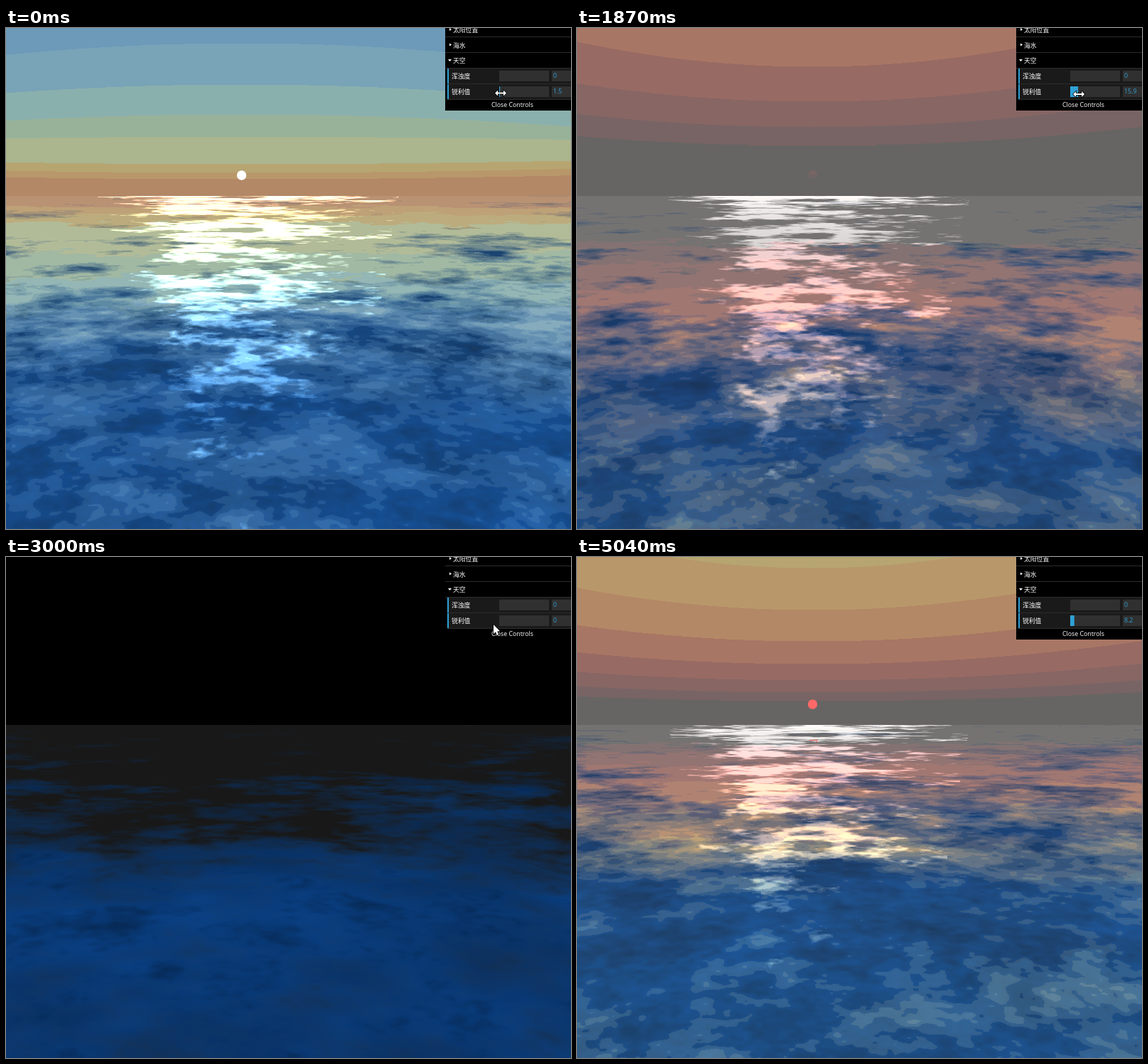
An HTML page with a canvas for the animation above (5140 ms loop, 795 by 704 pixels).

```html
<!DOCTYPE html>
<html lang="zh">
<head>
<meta charset="utf-8">
<title>Ocean sky</title>
<style>
  html, body { margin: 0; width: 100%; height: 100%; overflow: hidden; background: #000; }
  canvas { display: block; }
</style>
</head>
<body>
<canvas id="stage" width="795" height="704"></canvas>
<script>
const start = performance.now();
const W = 795, H = 704, HORIZON = 236, SUN_X = 331, LOOP = 5140, STEP = 157.5;
const ctx = document.getElementById('stage').getContext('2d');
const image = ctx.createImageData(W, H);
const px = image.data.fill(255);

// slider value at a few steps; linear in between
const drag = [[0, 1.5], [8, 12.6], [12, 15.9], [16, 4.9], [18, 0], [21, 0], [27, 7.1], [28, 8.2], [33, 8.2]];

// sky colours from the horizon up; the band limits grow geometrically
const bands = '676564 786464 876664 986a64 a87664 b38866 b8986a b6a570 abb58e abb58e 98b29a 8ab0ad 79a3b7 6d9ab9'
  .split(' ').map(hex => parseInt(hex, 16));

const clamp = (x, lo, hi) => x < lo ? lo : x > hi ? hi : x;

function sliderAt(step) {
  const i = drag.findIndex(k => k[0] > step), [s0, v0] = drag[i - 1], [s1, v1] = drag[i];
  return v0 + (v1 - v0) * (step - s0) / (s1 - s0);
}

const sunColor = v => [255, clamp(255 - 68 * (v - 4.8), 104, 255), clamp(255 - 45 * (v - 1.5), 104, 255)];

// tileable fractal noise
const N = 256, noise = new Float32Array(N * N);
let seed = 7;
const random = () => (seed = seed * 16807 % 2147483647) / 2147483647;
for (let cells = 8, amp = .62; cells <= 64; cells *= 2, amp *= .8) {
  const grid = Array.from({ length: cells * cells }, () => random() * 2 - 1);
  const size = N / cells, ease = p => p * p * (3 - 2 * p);
  for (let y = 0; y < N; y++) for (let x = 0; x < N; x++) {
    const gx = Math.floor(x / size), gy = Math.floor(y / size);
    const fx = ease(x / size - gx), fy = ease(y / size - gy);
    const at = (i, j) => grid[(j % cells) * cells + i % cells];
    const top = at(gx, gy) * (1 - fx) + at(gx + 1, gy) * fx;
    const low = at(gx, gy + 1) * (1 - fx) + at(gx + 1, gy + 1) * fx;
    noise[y * N + x] += (top * (1 - fy) + low * fy) * amp;
  }
}

function sample(u, v) {
  const iu = Math.floor(u), iv = Math.floor(v), fu = u - iu, fv = v - iv;
  const x0 = iu & 255, x1 = (iu + 1) & 255, r0 = (iv & 255) << 8, r1 = ((iv + 1) & 255) << 8;
  const a = noise[r0 + x0], b = noise[r0 + x1], c = noise[r1 + x0], d = noise[r1 + x1];
  const top = a + (b - a) * fu;
  return top + (c + (d - c) * fu - top) * fv;
}

// sky colour for every height above the horizon
const sky = new Uint8Array(800 * 3);
function buildSky(value) {
  const light = Math.min(1, value), v = Math.max(value, .5);
  for (let h = 0; h < 800; h++) {
    const clear = Math.max(h / v ** 1.13, 28 / v ** 2);
    const c = bands[clamp(Math.ceil(Math.log(clear / 3.1) / Math.log(1.37)), 0, bands.length - 1)];
    sky.set([(c >> 16) * light, (c >> 8 & 255) * light, (c & 255) * light], h * 3);
  }
}

function paintSky(value) {
  const flat = clamp((3 - value) / 1.5, 0, 1);
  for (let y = 0; y < HORIZON; y++) {
    const d = HORIZON - y, bend = Math.max(-.15, .38 * (1 - flat * d / 70));
    for (let x = 0; x < W; x++) {
      const u = (x - SUN_X) / 465, s = Math.floor(d / (1 + bend * u * u)) * 3, o = (y * W + x) * 4;
      px[o] = sky[s]; px[o + 1] = sky[s + 1]; px[o + 2] = sky[s + 2];
    }
  }
}

// edge: row where the reflection gives way to deep water
function paintSea(t, value, edge, sun) {
  const level = x => value ? Math.round(x * 8) / 8 : x;
  const light = Math.min(1, value);
  for (let y = HORIZON; y < H; y++) {
    const d = y - HORIZON, row = 300 * Math.log(d + 60), spread = .3 * (d + 80) / (d + 130);
    const bow = 40 * d / (d + 100);
    const mean = clamp(.55 + (edge - y) / 250, .14, 1.05);
    const rough = Math.min(1, .35 + d / 120) * (.3 + .7 * Math.min(1, mean));
    const fade = Math.min(0, (edge + 30 - y) / 150) + .5 * Math.exp(-d / 18);
    const haze = 50 * Math.exp(-d / 50), width = 150 - .12 * d;
    for (let x = 0; x < W; x++) {
      const u = (x - SUN_X) / 465, X = (x - SUN_X) * spread, Z = row - bow * u * u;
      const swell = sample(X * .3 + t * 1.5, Z * .3 - t * 6);
      const chop = .7 * (sample(X + t * 4, Z - t * 14) + sample(X * 1.6 - t * 5 + 90, Z * 1.3 - t * 9 + 50));
      const mirror = level(clamp(mean + (.45 * swell + .6 * chop) * rough, .1, 1));
      const deep = (1 - mirror) * (.87 + .2 * level(chop));
      const s = Math.floor(clamp((d * .9 + 10) * (1 + .15 * chop), 0, 799)) * 3;

      let glint = 0, spot = false;
      const beam = 1 - ((x - 340) / width) ** 2;
      if (beam > -1 && light) {
        const ripple = sample(X * 1.9 + 30, Z * 1.5 - t * 17);
        const shine = (beam * .55 - .28 + ripple * 1.1 + chop * .4 + fade) * 1.4;
        glint = level(clamp(shine, 0, 1) * (.3 + .7 * mirror)) * light;
        spot = value < 15 && Math.abs(x - SUN_X) < 8 && d > 20 && d < 28 && ripple > .2;
      }
      const o = (y * W + x) * 4, gain = .9 * mirror + .85 * glint, add = 24 * mirror + haze * glint;
      px[o] = spot ? sun[0] : 8 * deep + sky[s] * gain + add;
      px[o + 1] = spot ? sun[1] : 72 * deep + sky[s + 1] * gain + add;
      px[o + 2] = spot ? sun[2] : 152 * deep + sky[s + 2] * gain + add;
    }
  }
}

function paintSun(value, sun) {
  const rgb = sun.map(Math.round).join();
  const top = clamp((16.5 - value) / 4, 0, 1) * Math.min(1, value);
  const low = top * clamp((14 - value) / 3, 0, 1);
  const fill = ctx.createLinearGradient(0, 200, 0, 213);
  fill.addColorStop(0, `rgba(${rgb},${top})`);
  fill.addColorStop(1, `rgba(${rgb},${low})`);
  ctx.fillStyle = fill;
  ctx.beginPath();
  ctx.arc(SUN_X + .5, 207, 6.7, 0, 7);
  ctx.fill();
}

function box(color, x, y, w, h) {
  ctx.fillStyle = color;
  ctx.fillRect(x, y, w, h);
}

function label(text, x, y, color = '#fff') {
  ctx.fillStyle = color;
  ctx.fillText(text, x, y);
}

function shape(points, x, y, outline) {
  ctx.beginPath();
  points.forEach(([a, b]) => ctx.lineTo(x + a, y + b));
  ctx.closePath();
  if (outline) {
    ctx.lineWidth = 1.5;
    ctx.strokeStyle = outline;
    ctx.stroke();
  }
  ctx.fillStyle = '#fff';
  ctx.fill();
}

function paintPanel(value) {
  ctx.font = '8.8px "Open Sans", "Noto Sans CJK SC", "Noto Sans CJK", sans-serif';
  box('#000', 618, 0, 177, 116);
  ['太阳位置', '海水', '天空'].forEach((name, i) => {
    const y = 2 + i * 21.5;
    label(name, 629, y + 4);
    shape(i < 2 ? [[0, -2], [3, 0], [0, 2]] : [[-2, -1], [3, -1], [.5, 2]], 624, y);
    box('#2c2c2c', 618, 12 + i * 22, 177, 1);
  });
  [['浑浊度', 0], ['锐利值', value]].forEach(([name, n], i) => {
    const y = 57 + i * 22;
    box('#1a1a1a', 621, y, 174, 21);
    box('#2c2c2c', 621, y + 21, 174, 1);
    box('#2fa1d6', 621, y, 2, 21);
    box('#303030', 694, y + 3, 70, 15);
    box('#2fa1d6', 694, y + 3, n * .7, 15);
    box('#303030', 768, y + 3, 27, 15);
    label(name, 627, y + 14);
    label(String(+n.toFixed(1)), 770, y + 13, '#2fa1d6');
  });
  label('Close Controls', 683, 111);
}

function paintCursor(step, value) {
  const y = 91.5 + step * .13;
  if (step >= 18 && step < 21) {
    shape([[0, 0], [0, 13], [3, 10.3], [5, 15], [7.2, 14], [5.2, 9.5], [9, 9.3]], 686, y + 1, '#000');
  } else if (step < 29) {
    const half = [[-8, 0], [-4, -4], [-4, -1], [4, -1], [4, -4]];
    shape([...half, ...half.map(([a, b]) => [-a, -b])], 695 + value * .7, y, '#000');
  }
}

function paint(step) {
  const value = sliderAt(step), sun = sunColor(value);
  const edge = 415 + 65 * Math.cos((step - 8) / 19 * Math.PI);
  buildSky(value);
  paintSky(value);
  paintSea(step * STEP / 1000, value, edge, sun);
  ctx.putImageData(image, 0, 0);
  paintSun(value, sun);
  paintPanel(value);
  paintCursor(step, value);
}

let shown = -1;
function tick() {
  const t = (performance.now() - start) % LOOP;
  const step = Math.min(32, Math.floor((t + 20) / STEP));
  if (step !== shown) paint(shown = step);
  requestAnimationFrame(tick);
}
tick();
</script>
</body>
</html>
```
